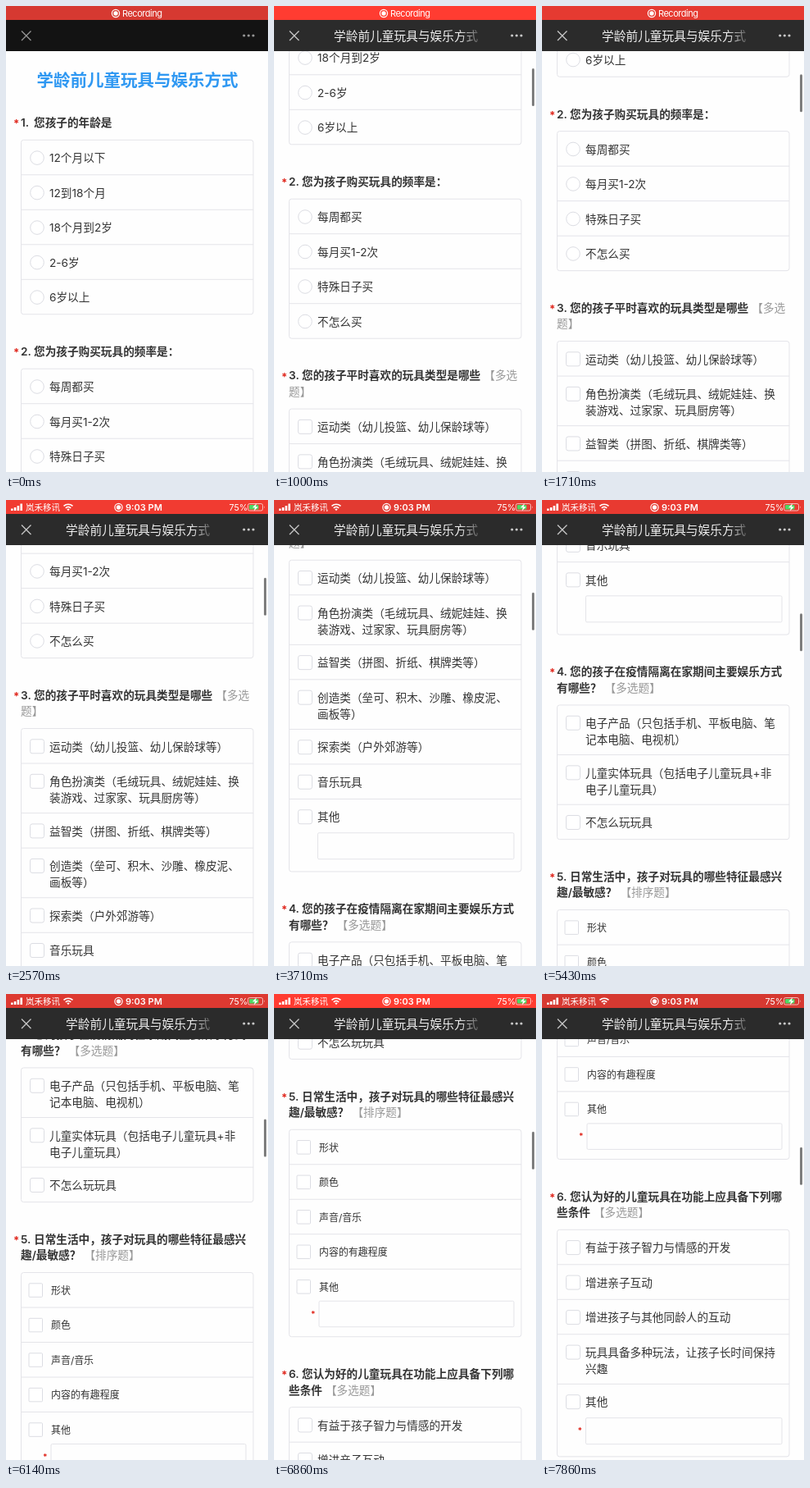
Write an HTML page that moves like this. It is 320 by 568 pixels and loops after 8 s.

```html
<!DOCTYPE html>
<html lang="zh-CN">
<head>
<meta charset="utf-8">
<title>学龄前儿童玩具与娱乐方式</title>
<style>
  html, body { margin: 0; width: 100%; height: 100%; overflow: hidden; background: #fefefe; }
  svg { display: block; width: 100%; height: 100%; }
  text {
    font: 13.65px Inter, "Noto Sans CJK SC", "Noto Sans CJK", sans-serif;
    fill: #333; white-space: pre; text-spacing-trim: space-all;
  }
  .head { font-weight: 600; }
  .tag { font-weight: 400; fill: #999; }
  .star { font-weight: 700; fill: #e0281e; }
  .small { font-size: 11.95px; }
  .title { font-size: 20.5px; font-weight: 600; fill: #2f98f2; }
  .line { fill: none; stroke: #e4e4e9; }
  .mark { fill: #fff; stroke: #dcdde3; }
  .status text { font-size: 11px; fill: #fff; }
  .white { fill: #fff; }
  .stroke { fill: none; stroke: #fff; }
</style>
</head>
<body>
<svg viewBox="0 0 320 568" xmlns="http://www.w3.org/2000/svg">
  <defs>
    <linearGradient id="fade" gradientUnits="userSpaceOnUse" x1="226" x2="252" y1="0" y2="0">
      <stop offset="0" stop-color="#eee"/>
      <stop offset="1" stop-color="#eee" stop-opacity=".2"/>
    </linearGradient>
    <g id="rec">
      <circle class="stroke" r="4.6" stroke-width="1.2"/>
      <circle class="white" r="2.7"/>
    </g>
  </defs>
  <rect width="320" height="568" fill="#fefefe"/>
  <g id="page"></g>
  <rect id="thumb" x="315" width="3" height="46" rx="1.5" fill="#7d7d7d"/>

  <rect id="nav" y="17" width="320" height="38"/>
  <g id="icons">
    <path d="M19 30.5l11.5 11.5M30.5 30.5l-11.5 11.5" fill="none" stroke="currentColor" stroke-width="1.3"/>
    <g fill="currentColor">
      <circle cx="290.7" cy="36" r="1.6"/><circle cx="296.3" cy="36" r="1.6"/><circle cx="302" cy="36" r="1.6"/>
    </g>
  </g>
  <text id="navTitle" x="73" y="41.6" style="font-size:14.7px;font-weight:500;fill:url(#fade)">学龄前儿童玩具与娱乐方式</text>

  <rect id="bar" width="320" height="17"/>
  <g id="recording" class="status">
    <use href="#rec" x="134" y="9"/>
    <text x="142" y="13" textLength="49">Recording</text>
  </g>
  <g id="clock" class="status">
    <path class="white" d="M6 13v-2.5h2.6V13zM9.8 13V9h2.6v4zM13.6 13V7h2.6v6zM17.4 13V4.5H20V13z"/>
    <text x="24" y="13" style="font-size:10.5px">岚禾移讯</text>
    <g class="stroke" stroke-width="1.6">
      <path d="M70.5 7.4a8 8 0 0 1 11 0M72.8 9.8a4.8 4.8 0 0 1 6.4 0"/>
    </g>
    <path class="white" d="M74.3 11.3a2.6 2.6 0 0 1 3.4 0L76 13.2z"/>
    <use href="#rec" x="137.5" y="9"/>
    <text x="146" y="13" style="font-weight:600">9:03 PM</text>
    <text x="272.5" y="13" style="font-size:10.7px">75%</text>
    <rect class="stroke" x="295.5" y="4.5" width="18" height="8.5" rx="2" stroke-opacity=".65"/>
    <rect x="297" y="6" width="11.5" height="5.5" rx="1" fill="#4cd964"/>
    <path class="white" d="M315 7.2q1.6 1.5 0 3z" fill-opacity=".65"/>
    <path class="white" d="M306 4l-5 5.3h3L302.800 13.500l5-5.300h-3z"/>
  </g>
</svg>
<script>
const $ = id => document.getElementById(id);
const LINE = 19.5, ROW = 42.5, ROW_EXTRA = 18.1, OPTION_LINE = 20;
const OTHER = '其他';

const questions = [
  { kind: 'radio', title: ['您孩子的年龄是'],
    options: ['12个月以下', '12到18个月', '18个月到2岁', '2-6岁', '6岁以上'] },
  { kind: 'radio', title: ['您为孩子购买玩具的频率是：'],
    options: ['每周都买', '每月买1-2次', '特殊日子买', '不怎么买'] },
  { kind: 'check', title: ['您的孩子平时喜欢的玩具类型是哪些#【多选', '#题】'],
    options: ['运动类（幼儿投篮、幼儿保龄球等）', '角色扮演类（毛绒玩具、绒妮娃娃、换|装游戏、过家家、玩具厨房等）',
      '益智类（拼图、折纸、棋牌类等）', '创造类（垒可、积木、沙雕、橡皮泥、|画板等）',
      '探索类（户外郊游等）', '音乐玩具', OTHER] },
  { kind: 'check', title: ['您的孩子在疫情隔离在家期间主要娱乐方式', '有哪些？#【多选题】'],
    options: ['电子产品（只包括手机、平板电脑、笔|记本电脑、电视机）',
      '儿童实体玩具（包括电子儿童玩具+非|电子儿童玩具）', '不怎么玩玩具'] },
  { kind: 'sort', title: ['日常生活中，孩子对玩具的哪些特征最感兴', '趣/最敏感？#【排序题】'], required: true,
    options: ['形状', '颜色', '声音/音乐', '内容的有趣程度', OTHER] },
  { kind: 'check', title: ['您认为好的儿童玩具在功能上应具备下列哪', '些条件#【多选题】'], required: true,
    options: ['有益于孩子智力与情感的开发', '增进亲子互动', '增进孩子与其他同龄人的互动',
      '玩具具备多种玩法，让孩子长时间保持|兴趣', OTHER] }
];

// Text is placed by the vertical centre of its CJK glyphs.
const text = (x, cy, str, cls = '', size = 13.65) =>
  `<text x="${x}" y="${cy + size * .38}" class="${cls}">${str}</text>`;
const box = (x, y, w, h, r, cls) =>
  `<rect x="${x}" y="${y}" width="${w}" height="${h}" rx="${r}" class="${cls}"/>`;
const star = (x, cy, size) =>
  `<text x="${x}" y="${cy + size * .52}" class="star" style="font-size:${size}px">*</text>`;

function heading(x, cy, str) {
  const [title, tag] = str.split('#');
  const gap = title ? 4 : 0;
  return text(x, cy, title + (tag ? `<tspan class="tag" dx="${gap}">${tag}</tspan>` : ''), 'head');
}

function marker(kind, cy) {
  if (kind === 'radio') return `<circle cx="38" cy="${cy}" r="8.3" class="mark"/>`;
  return kind === 'sort' ? box(28, cy - 8.5, 16.5, 16.5, 1, 'mark') : box(29.5, cy - 8.5, 17, 17, 2.5, 'mark');
}

function buildPage() {
  let out = text(37.500, 90, '学龄前儿童玩具与娱乐方式', 'title', 20.5);
  let y = 142;
  questions.forEach(({ kind, title, options, required }, i) => {
    out += star(9, y - .5, 13) + text(18, y, `${i + 1}.`, 'head');
    title.forEach((str, n) => out += heading(n ? 18 : 34, y + n * LINE, str));
    const top = y += (title.length - 1) * LINE + 21.3;
    const sort = kind === 'sort';
    options.forEach((option, n) => {
      if (n) out += `<path d="M18.500 ${y}H302" class="line"/>`;
      const lines = option.split('|');
      const cy = y + 21.8;
      out += marker(kind, cy);
      lines.forEach((str, k) => out += text(sort ? 55 : 53, cy + k * OPTION_LINE, str,
        sort ? 'small' : '', sort ? 11.95 : 13.65));
      if (option === OTHER) {
        const [x, dy, h] = sort ? [55, 39, 31.5] : [53.5, 41.3, 32];
        out += box(x, y + dy, 293 - x, h, 1.5, 'line');
        if (required) out += star(x - 10, y + dy + h / 2 - 1.5, 10);
        y += sort ? 82.5 : 88.5;
      } else y += ROW + (lines.length - 1) * ROW_EXTRA;
    });
    out += box(18.5, top, 283.5, y - top, 3, 'line');
    y += 45.1;
  });
  $('page').innerHTML = out;
}

const LOOP = 8000, STEP = 1000 / 7;
const keys = [[143, 0], [1000, 207], [2571, 419.5], [3714, 651.3], [5429, 913.8], [6857, 1248], [7857, 1464.4]];
const slopes = keys.slice(1).map(([t, s], i) => (s - keys[i][1]) / (t - keys[i][0]));
const tangents = keys.map((_, i) => {
  const a = slopes[i - 1], b = slopes[i];
  return i === 0 ? 0 : b === undefined ? a : 2 * a * b / (a + b);
});

// Monotone cubic through the scroll keys.
function scrollAt(t) {
  if (t <= keys[0][0]) return 0;
  let i = keys.findIndex(k => t <= k[0]) - 1;
  if (i < 0) return keys[keys.length - 1][1];
  const [t0, s0] = keys[i], [t1, s1] = keys[i + 1];
  const h = t1 - t0, u = (t - t0) / h, v = 1 - u;
  return s0 * (1 + 2 * u) * v * v + s1 * u * u * (3 - 2 * u)
    + h * u * v * (tangents[i] * v - tangents[i + 1] * u);
}

const mix = (a, b, k) => a + (b - a) * k;
const grey = v => `rgb(${v},${v},${v})`;

function draw(now) {
  const t = Math.floor(((now % LOOP) + 3) / STEP) * STEP;
  const scroll = scrollAt(t);
  const shown = Math.min(1, Math.max(0, (scroll - 8) / 35));
  const pulse = .5 + .5 * Math.cos((t - 1000) / 1954 * 2 * Math.PI);
  $('page').setAttribute('transform', `translate(0 ${-scroll})`);
  $('thumb').setAttribute('y', 57.7 + scroll * .0882);
  $('thumb').style.opacity = scroll > 0 ? 1 : 0;
  $('nav').style.fill = grey(mix(19, 43, shown));
  $('icons').style.color = grey(mix(150, 200, shown));
  $('navTitle').style.opacity = shown;
  $('bar').style.fill = `rgb(${mix(214, 255, pulse)},${mix(57, 60, pulse)},49)`;
  const recording = t < 1700;
  $('recording').style.display = recording ? '' : 'none';
  $('clock').style.display = recording ? 'none' : '';
}

buildPage();
const start = performance.now();
(function tick() {
  draw(performance.now() - start);
  requestAnimationFrame(tick);
})();
</script>
</body>
</html>
```
